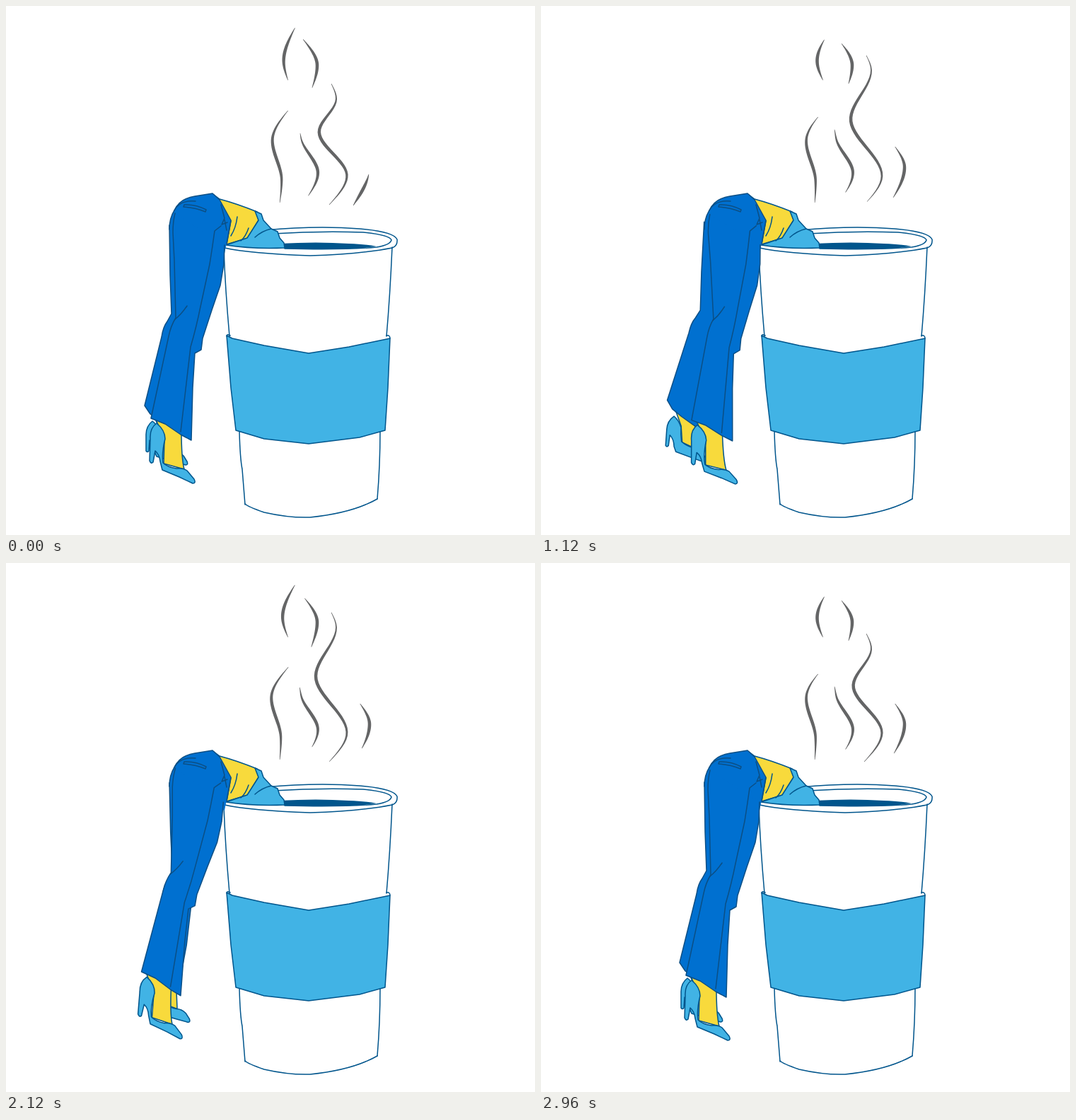
An HTML page for the animation above (3000 ms loop, 748x748 px).

```html
<!DOCTYPE html>
<html lang="en">
<head>
<meta charset="utf-8">
<title>Coffee dive</title>
<style>
  html, body { margin: 0; width: 100%; height: 100%; overflow: hidden; background: #fff; }
  svg { display: block; width: 100vw; height: 100vh; }
  path { fill: none; stroke-width: 1.5; stroke-linejoin: round; stroke-linecap: round; }
  .line { stroke: #00558c; }
  .seam { stroke: #0b4f85; }
  .sky { fill: #41b3e5; }
  .skin { fill: #f8da3c; }
  .denim { fill: #0070d0; }
  .coffee { fill: #00558c; }
  #steam path { fill: #646566; }
</style>
</head>
<body>
<svg viewBox="0 0 748 748">
  <g id="steam"></g>

  <g id="cup">
    <path class="line" d="M308 344Q310 400 316 467M546 341Q543 410 538 467M330 602Q331 640 334 655L338 705M529 601Q529 650 525 697"/>
    <path class="line" d="M338 704Q342 708 365 716Q400 724 430 723Q490 717 525 697"/>
    <path class="line sky" d="M312 466L320 470L365 480L428 491L485 482L543 470L540 540L536 600L500 610L428 619L365 612L325 600L318 540Z"/>
    <path class="line" d="M312 467Q312 463 317 466M538 466Q543 465 543 470"/>
    <path class="coffee" d="M386 336Q440 333 485 336Q510 337 524 340Q490 344 440 344L393 343Z"/>
    <path class="line" d="M366 317Q440 310 500 315Q548 319 553 330Q554 339 546 342Q500 351 430 353Q345 350 309 342"/>
    <path class="line" d="M378 322Q440 318 505 320Q543 324 545 331Q543 338 524 341Q480 345 394 343"/>
  </g>

  <g id="torso">
    <path class="line skin" d="M294 267L302 273Q325 279 355 291L357 303L342 328L312 337L318 304Z"/>
    <path class="line sky" d="M352 290L361 294L364 303L375 315L384 319L387 328L393 335L394 342Q350 344 311 338L341 328L357 303Z"/>
    <path class="line" d="M327 298Q325 314 318 325M343 314Q339 326 332 332M375 315Q362 318 352 327"/>
  </g>

  <g id="backLeg">
    <path class="line skin" d="M207 575L218 600L221 623L239 630L238 598Z"/>
    <path class="line sky" d="M207 587Q198 594 198 606L198 629Q200 632 202 629L203 614Q209 619 210 630L213 637L240 645L254 649Q258 649 256 644L251 636Q245 630 238 630Q228 628 220 622Q218 612 218 602Q214 592 207 587Z"/>
    <path class="seam denim" d="M231 310L232 380L234 435L228 446Q222 454 220 468L196 565L204 577L218 587L241 601L253 540L260 484L268 455L285 400L296 330"/>
  </g>

  <g id="hip">
    <path class="denim" d="M231 316L309 350L318 303L292 265L238 289Z"/>
    <path class="seam denim" d="M231 316Q231 300 238 289Q246 272 267 269L292 265L302 274L318 303L312 336"/>
  </g>

  <g id="frontLeg">
    <path class="line skin" d="M212 585L224 612L223 647L252 655Q248 640 248 600Z"/>
    <path class="line sky" d="M213 590Q203 597 204 612L203 643Q205 648 208 645L211 629Q217 634 218 644L221 656L245 666L264 675Q269 675 266 669L256 657Q250 653 241 654Q228 652 222 646Q220 632 225 612Q225 600 213 590Z"/>
    <path class="seam denim" d="M239 293Q236 305 236 320L238 360L240 441Q233 452 230 467L205 583L225 591L247 606L262 614L264 540L267 491L276 486L278 470L291 430L303 395L308 365L309 338"/>
    <path class="seam" d="M256 424Q248 436 239 443M304 311L295 318Q292 340 288 365L275 425Q269 455 261 482L247 602"/>
  </g>

  <path class="seam" d="M252 281Q268 280 283 288L282 291Q267 285 251 284ZM238 289Q246 274 268 276M304 281L309 300L305 309L313 306M309 302L312 317"/>
</svg>
<script>
const LOOP = 3000, STEP = 40, STEAM_PERIOD = 1840;
const TAU = 2 * Math.PI;
const byId = id => document.getElementById(id);

const wave = (mid, amp, phase) => t => mid + amp * Math.cos(TAU * (t / STEAM_PERIOD - phase));
const fixed = value => () => value;
const leftSway = wave(-2, 2, 0.9);

// Each wisp runs through a few turning points [x, y] and is trimmed to the span top..bottom.
const longTop = t => 70 + Math.max(0, 40 * (1 - t / 1120), 30 * (t - 2400) / 560);
const wisps = [
  { points: () => [[409, 30], [393, 78], [399, 106]],
    top: wave(39, 9, 0.57), bottom: fixed(105), sway: leftSway },
  { points: () => [[420, 47], [440, 84], [432, 118]],
    top: wave(51, 4, 0.45), bottom: wave(114, 5, 0.2) },
  { points: t => {
      const top = longTop(t), drop = top - 70;
      return [[460, top], [467, top + 21], [438 + 0.12 * drop, 160 + 0.45 * drop], [482, 240], [457, 281]];
    },
    top: longTop, bottom: t => 281 - 23 * Math.exp(-(((t - 1480) / 280) ** 2)) },
  { points: () => [[401, 145], [377, 190], [390, 246], [387, 279]],
    top: wave(152, 5, 0.6), bottom: fixed(278), sway: leftSway },
  { points: () => [[414, 171], [418, 190], [441, 236], [425, 272]],
    top: wave(176, 5, 0.9), bottom: wave(263, 9, 0.85) },
  { points: () => [[500, 198], [514, 228], [491, 282]],
    top: t => 199 + 39 * Math.max(0, 1 - t / 800), bottom: t => 272 + 10 * Math.cos(TAU * t / 4200) }
];

// Monotone cubic: flat at turning points, steeper at the free ends.
function xAt(points, y) {
  const last = points.length - 1;
  const secant = k => (points[k + 1][0] - points[k][0]) / (points[k + 1][1] - points[k][1]);
  const slope = k => {
    if (k === 0) return 1.5 * secant(0);
    if (k === last) return 1.5 * secant(last - 1);
    const a = secant(k - 1), b = secant(k);
    return a * b > 0 ? 2 * a * b / (a + b) : 0;
  };
  let i = 0;
  while (i < last - 1 && y > points[i + 1][1]) i++;
  const [x0, y0] = points[i], [x1, y1] = points[i + 1];
  const h = y1 - y0, u = (y - y0) / h, v = 1 - u;
  return x0 * (1 + 2 * u) * v * v + slope(i) * h * u * v * v
       + x1 * u * u * (3 - 2 * u) - slope(i + 1) * h * u * u * v;
}

function wispPath({ points, top, bottom, sway = fixed(0) }, t) {
  const knots = points(t), y0 = top(t), y1 = bottom(t), bend = sway(t);
  const at = u => {
    const y = y0 + (y1 - y0) * u;
    return [xAt(knots, y) + bend * Math.sin(Math.PI * u), y];
  };
  const left = [], right = [], n = 40;
  for (let i = 0; i <= n; i++) {
    const u = i / n, [x, y] = at(u);
    const [ax, ay] = at(Math.max(u - 0.02, 0)), [bx, by] = at(Math.min(u + 0.02, 1));
    const half = (0.3 + 2 * Math.sin(Math.PI * u)) / Math.hypot(bx - ax, by - ay);
    const dx = (by - ay) * half, dy = (ax - bx) * half;
    left.push(`${(x - dx).toFixed(2)} ${(y - dy).toFixed(2)}`);
    right.unshift(`${(x + dx).toFixed(2)} ${(y + dy).toFixed(2)}`);
  }
  return "M" + [...left, ...right].join("L") + "Z";
}

const gather = power => u => u ** power;
const settle = u => u * (2 - u);

// Leg swing at the toe: [end time, end shift, easing] per stroke.
const frontStrokes = [[640, 17, settle], [1840, -24, gather(2)], [2960, 0, gather(1)]];
const backStrokes = [[1250, -26, gather(1)], [2400, 16, gather(1.3)], [2960, 0, gather(1)]];

function shiftAt(strokes, t) {
  let from = 0, begin = 0;
  for (const [end, to, ease] of strokes) {
    if (t < end) return from + (to - from) * ease((t - begin) / (end - begin));
    [from, begin] = [to, end];
  }
  return from;
}

function swing(id, shift, radius) {
  const angle = -shift / radius * 360 / TAU;
  byId(id).setAttribute("transform", `rotate(${angle.toFixed(3)} 301 303)`);
}

for (const wisp of wisps) {
  wisp.node = document.createElementNS("http://www.w3.org/2000/svg", "path");
  byId("steam").append(wisp.node);
}

function draw(t) {
  swing("frontLeg", shiftAt(frontStrokes, t), 371);
  swing("backLeg", shiftAt(backStrokes, t), 345);
  for (const wisp of wisps) wisp.node.setAttribute("d", wispPath(wisp, t));
}

const start = performance.now();
function tick() {
  const t = (performance.now() - start) % LOOP;
  draw(Math.floor(t / STEP) * STEP);
  requestAnimationFrame(tick);
}
tick();
</script>
</body>
</html>
```
